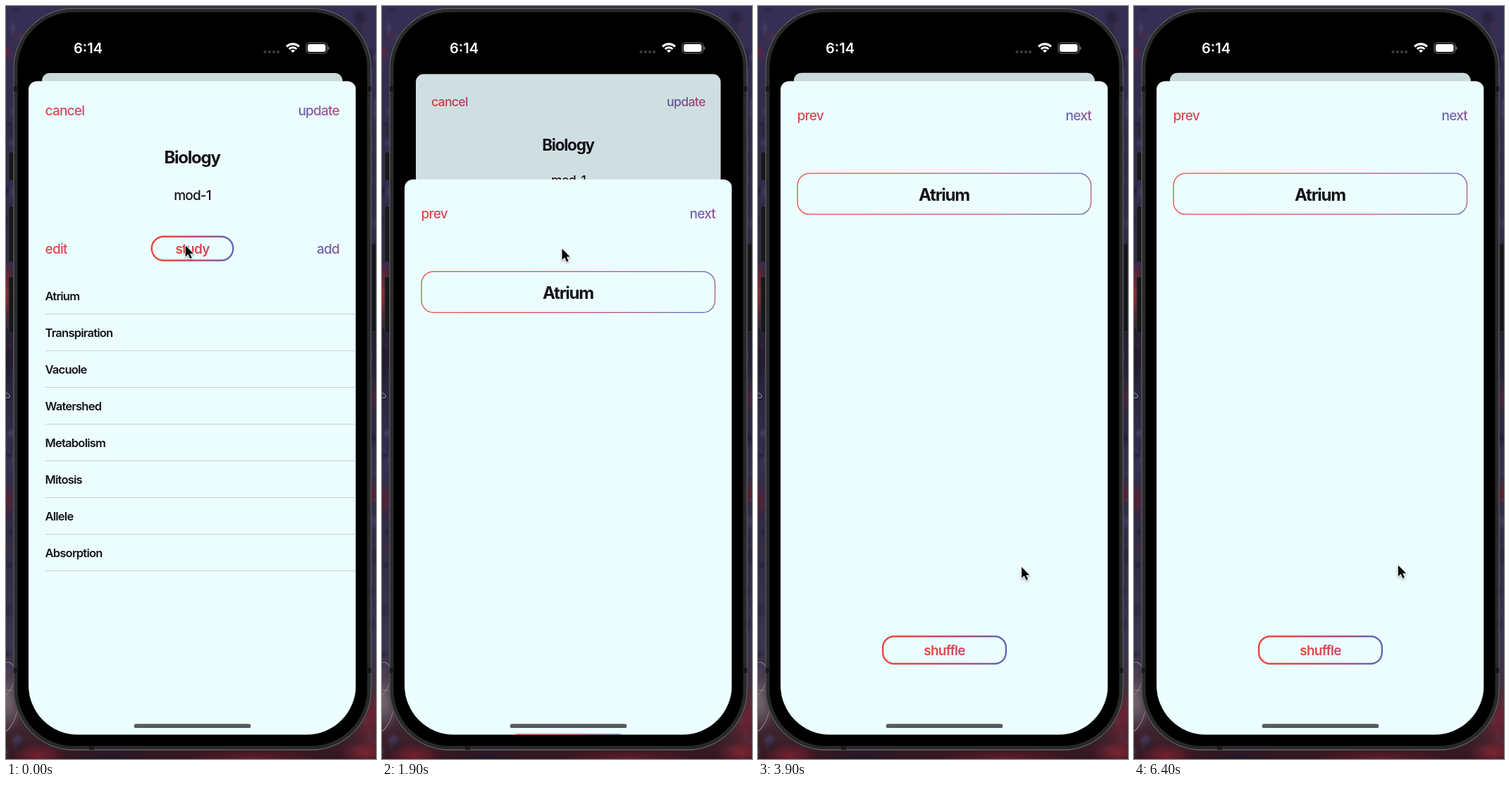
Write an HTML page with a canvas that moves like this. It is 525 by 1067 pixels and loops after 6.5 s.

```html
<!DOCTYPE html>
<html lang="en">
<head>
<meta charset="utf-8">
<title>Flashcards</title>
<style>
html, body { margin: 0; width: 100%; height: 100%; overflow: hidden; background: #000; }
canvas { display: block; width: 525px; height: 1067px; }
</style>
</head>
<body>
<canvas id="stage"></canvas>
<script>
const W = 525, H = 1067, LOOP = 6500, STEP = 100;
const RED = '#e8483f', MID = '#bd4a80', BLUE = '#6469b1';
const PAPER = '#ebfdff', INK = '#15131a';
const FONT = 'Inter, "Noto Sans", sans-serif';
const LEFT = 56, RIGHT = 473, CENTER = 264.5;
const SHEET = { x: 32, y: 106.5, w: 464.5, bottom: 1032.5 };
const TITLE = { size: 24, weight: 700, align: 'center', track: -0.052 };
const BODY = { weight: 550, align: 'center', track: -0.044 };
const TERMS = ['Atrium', 'Transpiration', 'Vacuole', 'Watershed',
  'Metabolism', 'Mitosis', 'Allele', 'Absorption'];

const stage = document.getElementById('stage');
const dpr = window.devicePixelRatio || 1;
stage.width = W * dpr;
stage.height = H * dpr;
const main = stage.getContext('2d');
let c = main;

const clamp = v => Math.min(1, Math.max(0, v));
const lerp = (a, b, k) => a + (b - a) * k;
const ramp = (t, from, to) => clamp((t - from) / (to - from));
const smooth = k => k * k * (3 - 2 * k);

// Critically damped spring, settled exactly after half a second
function spring(ms) {
  const f = s => 1 - (1 + 14.5 * s) * Math.exp(-14.5 * s);
  return clamp(f(Math.max(0, ms) / 1000) / f(0.5));
}

function across(x0, x1, ...stops) {
  const g = c.createLinearGradient(x0, 0, x1, 0);
  stops.forEach(([at, color]) => g.addColorStop(at, color));
  return g;
}

function box(x, y, w, h, r) {
  c.beginPath();
  c.roundRect(x, y, w, h, r);
}

function fillBox(x, y, w, h, r, color) {
  box(x, y, w, h, r);
  c.fillStyle = color;
  c.fill();
}

function text(str, x, y, { size = 19, weight = 500, align = 'left', fill = INK, track = -0.04 } = {}) {
  c.font = `${weight} ${size}px ${FONT}`;
  c.letterSpacing = `${size * track}px`;
  c.textAlign = align;
  c.fillStyle = fill;
  c.fillText(str, x, y);
}

const warm = (x, span = 110) => across(x, x + span, [0, RED], [0.5, MID], [1, BLUE]);
const cool = x => across(x, x + 110, [0, BLUE], [0.55, MID], [1, RED]);

function leftLink(str, y) {
  text(str, LEFT - 0.5, y, { fill: warm(LEFT, 125), weight: 530 });
}

function rightLink(str, y, width) {
  text(str, RIGHT, y, { align: 'right', fill: cool(RIGHT - width), weight: 530 });
}

function pill(label, x, y, w, h, r, baseline, alpha = 1) {
  box(x, y, w, h, r);
  c.lineWidth = 2.4;
  c.strokeStyle = across(x, x + w, [0, RED], [0.22, RED], [0.62, MID], [0.93, BLUE], [1, BLUE]);
  c.stroke();
  c.save();
  c.globalAlpha = alpha;
  text(label, CENTER, baseline, { weight: 600, align: 'center', fill: warm(CENTER - 25, 170) });
  c.restore();
}

function card(y, h) {
  box(56, y, 416.5, h, 17);
  c.lineWidth = 1.3;
  c.strokeStyle = across(56, 472.5, [0, RED], [0.35, '#e0484c'], [0.65, MID],
    [0.94, BLUE], [0.985, BLUE], [1, '#b0567c']);
  c.stroke();
}

function random(seed) {
  return () => (seed = (seed * 16807) % 2147483647) / 2147483647;
}

function blob(x, y, rx, ry, color) {
  c.save();
  c.translate(x, y);
  c.scale(rx, ry);
  const g = c.createRadialGradient(0, 0, 0, 0, 0, 1);
  g.addColorStop(0, color);
  g.addColorStop(1, color + '00');
  c.fillStyle = g;
  c.fillRect(-1, -1, 2, 2);
  c.restore();
}

function wallpaper() {
  const g = c.createLinearGradient(0, 0, 0, H);
  [[0, '#352f55'], [0.2, '#302d4c'], [0.33, '#2f2c49'], [0.46, '#261f35'], [0.6, '#332f50'],
    [0.72, '#302d47'], [0.85, '#3a3450'], [0.94, '#432d38'], [1, '#35161f']]
    .forEach(([at, color]) => g.addColorStop(at, color));
  c.fillStyle = g;
  c.fillRect(0, 0, W, H);

  const rnd = random(77);
  const tones = ['#544b7c', '#1a172b', '#423e62', '#211a30', '#4c2a40'];
  for (let i = 0; i < 160; i++) {
    const x = i % 2 ? rnd() * 26 : W - rnd() * 26;
    c.globalAlpha = 0.5;
    blob(x, rnd() * H, 4 + rnd() * 10, 4 + rnd() * 12, tones[i % tones.length]);
  }
  c.globalAlpha = 1;
  blob(0, 66, 9, 14, '#6c2038');
  blob(1, 408, 12, 52, '#a02224');
  blob(1, 505, 12, 40, '#221a2c');
  blob(2, 700, 11, 28, '#5c202f');
  blob(523, 430, 8, 30, '#452036');
  blob(523, 555, 8, 26, '#502537');
  blob(523, 690, 8, 22, '#5c202f');
  blob(0, 985, 28, 46, '#75686f');
  blob(518, 1010, 28, 56, '#6a2330');
  blob(45, 1062, 40, 18, '#74222f');
  blob(150, 1064, 60, 14, '#24172a');
  blob(350, 1066, 100, 12, '#621d2a');
  blob(510, 1058, 36, 18, '#7c2632');

  c.strokeStyle = '#80767c';
  c.lineWidth = 1.3;
  [[-6, 550, 12, 4], [-3, 955, 14, 26], [-2, 1000, 17, 32]].forEach(([x, y, rx, ry]) => {
    c.beginPath();
    c.ellipse(x, y, rx, ry, 0.3, 0, Math.PI * 2);
    c.stroke();
  });
}

function phone() {
  const key = (x, y, h) => {
    fillBox(x, y, 7, h, 2, '#17171a');
    c.strokeStyle = '#3a393d';
    c.lineWidth = 0.8;
    c.stroke();
  };
  key(4, 207, 40);
  key(4, 284, 79);
  key(4, 384, 79);
  key(518, 337, 125);

  fillBox(10, 2.5, 509, 1052.5, 86, '#19191b');
  box(11, 3.5, 507, 1050.5, 85);
  c.strokeStyle = '#66666a';
  c.lineWidth = 1.3;
  c.stroke();
  box(14, 6.5, 501, 1044.5, 82);
  c.strokeStyle = '#29292b';
  c.lineWidth = 4;
  c.stroke();
  c.fillStyle = '#18181a';
  [[11, 114, 6, 7], [512, 114, 6, 7], [11, 938, 6, 7], [512, 938, 6, 7],
    [118, 1048, 7, 6]].forEach(r => c.fillRect(...r));
  fillBox(17, 9, 495, 1039, 79, '#000');
}

function statusBar() {
  text('6:14', 116.5, 66.5, { size: 20, weight: 600, align: 'center', fill: '#fff', track: 0 });
  for (let i = 0; i < 4; i++) {
    c.beginPath();
    c.arc(367.5 + i * 6.2, 65, 2.1, 0, Math.PI * 2);
    c.fillStyle = '#3b3b3d';
    c.fill();
  }

  const wave = (r0, r1) => {
    const a = -Math.PI * 0.75, b = -Math.PI * 0.25;
    c.beginPath();
    c.arc(407, 66.3, r1, a, b);
    c.arc(407, 66.3, r0, b, a, true);
    c.closePath();
    c.fill();
  };
  c.fillStyle = '#fff';
  wave(0, 4.4);
  wave(6.1, 9);
  wave(10.8, 14);

  box(426, 52, 29.5, 15, 4.6);
  c.strokeStyle = '#77777a';
  c.lineWidth = 1.2;
  c.stroke();
  fillBox(428, 54, 25.5, 11, 3, '#fff');
  fillBox(456.8, 57.2, 1.6, 4.8, [0, 2, 2, 0], '#77777a');
}

function paper(y) {
  fillBox(SHEET.x, y, SHEET.w, SHEET.bottom - SHEET.y + 20, [12, 12, 0, 0], PAPER);
}

function listSheet(pressed) {
  paper(SHEET.y);
  leftLink('cancel', 155);
  rightLink('update', 155, 59);
  text('Biology', CENTER - 0.5, 222.5, TITLE);
  text('mod-1', CENTER, 274.5, BODY);
  leftLink('edit', 350.5);
  rightLink('add', 350.5, 32);
  pill('study', 206.7, 326.7, 115.6, 33.8, 16.9, 351, 1 - 0.48 * pressed);
  TERMS.forEach((term, i) => {
    const y = 417 + i * 52.05;
    text(term, LEFT - 0.5, y, { size: 16.5, weight: 580, track: -0.046 });
    c.fillStyle = '#c6d5d7';
    c.fillRect(LEFT, Math.round(y + 18.5), SHEET.x + SHEET.w - LEFT, 1);
  });
}

function studySheet(open) {
  paper(SHEET.y);
  leftLink('prev', 161.5);
  rightLink('next', 161.5, 36);
  card(237.2, 58);
  text('Atrium', CENTER - 0.5, 276, TITLE);
  if (open) {
    card(355.5, 93.5);
    text('a chamber connected to other chambers or', CENTER - 0.5, 387.3, BODY);
    text('passageways', CENTER - 0.5, 409.8, BODY);
  }
  pill('shuffle', 177.1, 893.2, 174.8, 38.8, 16, 920);
}

function pointer(x, y) {
  c.save();
  c.translate(x, y);
  c.scale(0.95, 0.95);
  c.beginPath();
  [[0, 0], [0, 16.6], [3.9, 13], [6.9, 19.4], [9.6, 18.2], [6.7, 12], [11.8, 11.8]]
    .forEach(p => c.lineTo(...p));
  c.closePath();
  c.shadowColor = 'rgba(0,0,0,.35)';
  c.shadowBlur = 3 * dpr;
  c.shadowOffsetY = 1.5 * dpr;
  c.lineJoin = 'round';
  c.lineWidth = 2;
  c.strokeStyle = '#fff';
  c.stroke();
  c.shadowColor = 'transparent';
  c.fillStyle = '#000';
  c.fill();
  c.restore();
}

function pointerAt(t) {
  const nudge = smooth(ramp(t, 300, 900));
  const go = smooth(ramp(t, 2600, 3500));
  const back = smooth(ramp(t, 5900, 6300));
  return [
    lerp(lerp(254.7, 255.5, nudge), 374, go) + back * 0.8,
    lerp(lerp(339.5, 344, nudge), 795, go) - back * 2.5
  ];
}

function screen(t) {
  const p = spring(t - 1670.5);
  const pressed = ramp(t, 1500, 1560) * (1 - ramp(t, 1800, 2000));

  c.save();
  box(SHEET.x, 60, SHEET.w, SHEET.bottom - 60, [0, 0, 70, 70]);
  c.clip();

  const inset = 19 + 18 * p;
  fillBox(SHEET.x + inset, 95 + 10 * p, SHEET.w - 2 * inset, 300, 11, '#cadadb');

  c.save();
  const s = 1 - 0.081 * p;
  c.translate(CENTER, SHEET.y - 11.7 * p);
  c.scale(s, s);
  c.translate(-CENTER, -SHEET.y);
  listSheet(pressed);
  fillBox(SHEET.x, SHEET.y, SHEET.w, 960, [12, 12, 0, 0], `rgba(0,0,0,${0.14 * p})`);
  c.restore();

  if (p > 0) {
    c.save();
    c.translate(0, (1 - p) * (SHEET.bottom - SHEET.y));
    studySheet(t >= 4400 && t < 6000);
    c.restore();
  }
  fillBox(181.7, 1017.3, 165.6, 5.8, 2.9, '#56595c');
  c.restore();
}

// The wallpaper and handset never change, so paint them once
const still = document.createElement('canvas');
still.width = stage.width;
still.height = stage.height;
c = still.getContext('2d');
c.scale(dpr, dpr);
wallpaper();
phone();
statusBar();
c = main;
c.scale(dpr, dpr);

const start = performance.now();
function frame(now) {
  const t = Math.floor((Math.max(0, now - start) + 4) / STEP) * STEP % LOOP;
  c.drawImage(still, 0, 0, W, H);
  screen(t);
  pointer(...pointerAt(t));
  requestAnimationFrame(frame);
}
frame(start);
</script>
</body>
</html>
```
